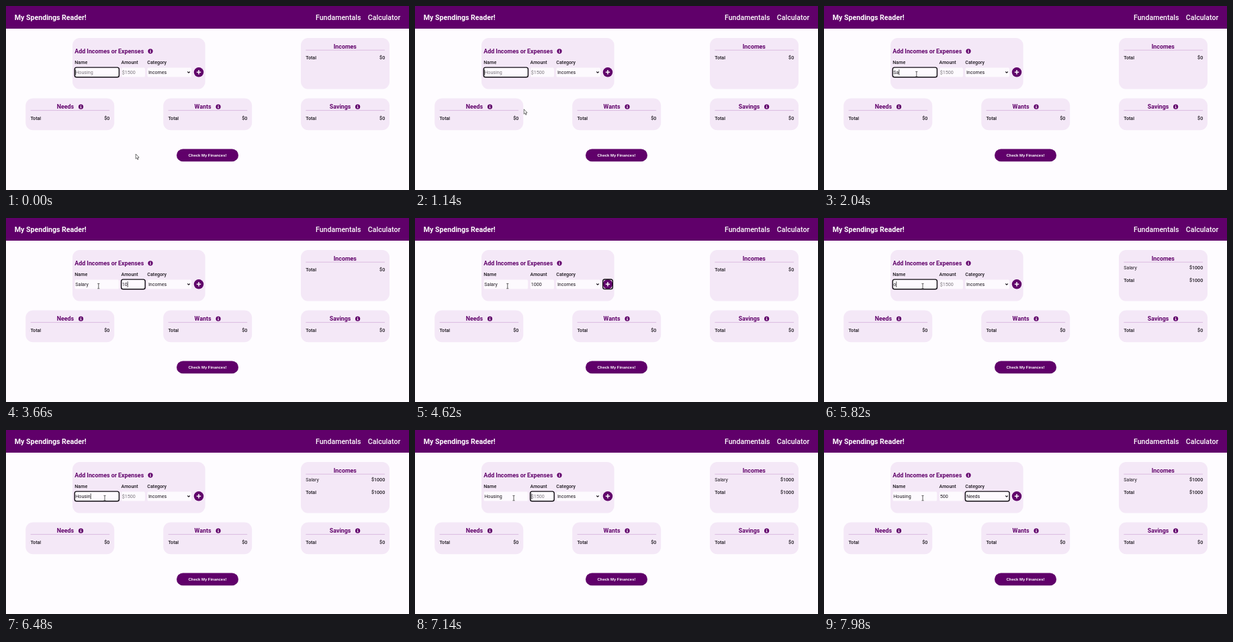
These frames come from a looping animation (600x276 px, 8000 ms). An HTML page with a canvas:

```html
<!DOCTYPE html>
<html lang="en">
<head>
<meta charset="utf-8">
<title>Budget form</title>
<style>
html, body { margin: 0; width: 100%; height: 100%; overflow: hidden; background: #fefcff; }
canvas { display: block; width: 600px; height: 276px; }
</style>
</head>
<body>
<canvas id="stage"></canvas>
<script>
const LOOP = 8000, BLINK = 300;
const PURPLE = '#60006a', CARD = '#f4e8f7', PAGE = '#fefcff', FIELD = '#fdfafe';
const INK = '#1c171e', GREY = '#7b767d', RULE = '#cfa9d6';
const BODY = 7.11, HEAD = 8.85;

const canvas = document.getElementById('stage');
const ctx = canvas.getContext('2d');
const dpr = window.devicePixelRatio || 1;
canvas.width = 600 * dpr;
canvas.height = 276 * dpr;
ctx.scale(dpr, dpr);

// Each entry lists only what it changes in the form.
const events = [
  [-60, { focus: 'name', name: '', amount: '', category: 'Incomes', saved: false }],
  [1800, { name: 'S' }],
  [2040, { name: 'Sa' }],
  [2160, { name: 'Sal' }],
  [2280, { name: 'Sala' }],
  [2370, { name: 'Salar' }],
  [2460, { name: 'Salary' }],
  [2580, { focus: 'amount' }],
  [2820, { amount: '1' }],
  [3000, { amount: '10' }],
  [3780, { amount: '100' }],
  [3900, { amount: '1000' }],
  [4200, { focus: 'category' }],
  [4500, { focus: 'add' }],
  [4800, { name: '', amount: '', saved: true }],
  [5400, { focus: 'name' }],
  [5820, { name: 'o' }],
  [6000, { name: '' }],
  [6120, { name: 'H' }],
  [6180, { name: 'Ho' }],
  [6240, { name: 'Hou' }],
  [6300, { name: 'Hous' }],
  [6420, { name: 'Housi' }],
  [6480, { name: 'Housin' }],
  [6540, { name: 'Housing' }],
  [6660, { focus: 'amount' }],
  [7140, { amount: '' }],
  [7200, { amount: '5' }],
  [7260, { amount: '50' }],
  [7320, { amount: '500' }],
  [7500, { focus: 'category' }],
  [7800, { category: 'Needs' }]
];

function formAt(t) {
  const form = {};
  for (const [at, change] of events) {
    if (at > t) break;
    Object.assign(form, change);
    form.caret = Math.floor((t - at) / BLINK) % 2 === 0;
  }
  return form;
}

function text(str, x, y, size = BODY, weight = 500, color = INK, align = 'left', family = 'Roboto') {
  ctx.font = `${weight} ${size}px ${family}, sans-serif`;
  ctx.fillStyle = color;
  ctx.textAlign = align;
  ctx.fillText(str, x, y);
}

function box(x, y, w, h, r, color) {
  ctx.beginPath();
  ctx.roundRect(x, y, w, h, r);
  ctx.fillStyle = color;
  ctx.fill();
}

function disc(x, y, r) {
  ctx.beginPath();
  ctx.arc(x, y, r, 0, Math.PI * 2);
  ctx.fillStyle = PURPLE;
  ctx.fill();
}

function line(points, color, width) {
  ctx.beginPath();
  points.forEach(([x, y], i) => i ? ctx.lineTo(x, y) : ctx.moveTo(x, y));
  ctx.strokeStyle = color;
  ctx.lineWidth = width;
  ctx.stroke();
}

function ring(x, y, w, h) {
  ctx.beginPath();
  ctx.roundRect(x, y, w, h, 2.8);
  ctx.strokeStyle = '#100c12';
  ctx.lineWidth = 1.4;
  ctx.stroke();
}

function info(x, y) {
  disc(x, y, 3.6);
  ctx.fillStyle = '#fff';
  ctx.fillRect(x - 0.5, y - 2.2, 1.1, 1.1);
  ctx.fillRect(x - 0.9, y - 0.5, 1.4, 0.7);
  ctx.fillRect(x - 0.4, y - 0.5, 0.9, 2.2);
  ctx.fillRect(x - 1.1, y + 1.3, 2.3, 0.7);
}

function row(label, value, x, y, weight = 500) {
  text(label, x + 7.3, y, BODY, weight);
  text(value, x + 125.2, y, BODY, 500, INK, 'right');
}

function card(title, x, titleX, iconX) {
  box(x, 138.6, 132, 47.6, 11, CARD);
  text(title, titleX, 154.2, HEAD, 700, PURPLE);
  info(iconX, 151.2);
  line([[x + 7.4, 156.6], [x + 125, 156.6]], RULE, 0.7);
  row('Total', '$0', x, 170.6);
}

function incomes(saved) {
  const x = 439;
  box(x, 48, 132, 76.6, 11, CARD);
  text('Incomes', 504.8, 63.8, HEAD, 700, PURPLE, 'center');
  line([[x + 7.4, 66.2], [x + 125, 66.2]], RULE, 0.7);
  if (saved) row('Salary', '$1000', x, 76.6, 400);
  row('Total', saved ? '$1000' : '$0', x, saved ? 95.6 : 80);
}

function input(x, w, value, hint, focused, caret) {
  box(x, 92.6, w, 14, 2.2, FIELD);
  if (focused) ring(x - 0.2, 92.1, w + 0.4, 14.6);
  text(value || hint, x + 0.9, 102.2, BODY, 400, value ? INK : GREY);
  if (focused && caret) {
    const end = x + 1 + (value ? ctx.measureText(value).width : 0);
    ctx.fillStyle = '#111';
    ctx.fillRect(end, 95.2, 0.7, 8.8);
  }
}

function entryForm(form) {
  box(99, 48, 197.6, 76.6, 11, CARD);
  text('Add Incomes or Expenses', 102.2, 71, HEAD, 700, PURPLE);
  info(215, 67.8);
  text('Name', 102.3, 86.7);
  text('Amount', 171.6, 86.7);
  text('Category', 210.3, 86.7);

  input(102.4, 65.8, form.name, 'Housing', form.focus === 'name', form.caret);
  input(171.8, 35.2, form.amount, '$1500', form.focus === 'amount', form.caret);

  box(210.4, 92.6, 65.6, 14, 2.2, FIELD);
  if (form.focus === 'category') ring(210.3, 92.1, 65.8, 14.6);
  text(form.category, 211.9, 102.2, BODY, 400);
  line([[270.3, 98.5], [272, 100.3], [273.7, 98.5]], INK, 1.1);

  disc(287, 99.3, 7.2);
  line([[283.8, 99.3], [290.2, 99.3]], '#fff', 1.5);
  line([[287, 96.1], [287, 102.5]], '#fff', 1.5);
  if (form.focus === 'add') ring(279.7, 92, 14.6, 14.6);
}

function slide(t, start, end) {
  const k = Math.min(1, Math.max(0, (t - start) / (end - start)));
  return k * k * (3 - 2 * k);
}

function pointer(t) {
  const k = slide(t, 720, 1500);
  const x = 193.2 - 55.4 * k + 9.2 * slide(t, 5100, 5400);
  const y = 222 - 120 * k;
  if (y < 107) {
    line([[x - 1.6, y - 3.6], [x + 1.6, y - 3.6]], '#333', 0.7);
    line([[x, y - 3.6], [x, y + 3.8]], '#333', 0.8);
    line([[x - 1.6, y + 3.8], [x + 1.6, y + 3.8]], '#333', 0.7);
    return;
  }
  ctx.beginPath();
  [[0, 0], [0, 7.2], [1.6, 5.8], [2.7, 8.4], [3.8, 7.9], [2.8, 5.4], [4.9, 5.2]]
    .forEach(([dx, dy]) => ctx.lineTo(x + dx, y + dy));
  ctx.closePath();
  ctx.fillStyle = '#fff';
  ctx.fill();
  ctx.strokeStyle = '#333';
  ctx.lineWidth = 0.7;
  ctx.stroke();
}

function draw(t) {
  const form = formAt(t);
  ctx.fillStyle = PAGE;
  ctx.fillRect(0, 0, 600, 276);
  ctx.fillStyle = PURPLE;
  ctx.fillRect(0, 0, 600, 34);
  text('My Spendings Reader!', 12.8, 20.9, 10.6, 700, '#fff');
  text('Fundamentals', 461, 20.8, 10.6, 500, '#fff');
  text('Calculator', 587.2, 20.8, 10.6, 500, '#fff', 'right');

  entryForm(form);
  incomes(form.saved);
  card('Needs', 29.2, 75.8, 111.5);
  card('Wants', 234.2, 280.6, 316);
  card('Savings', 439, 481.8, 523.6);

  box(254, 214.5, 92, 18.8, 9.4, PURPLE);
  text('Check My Finances!', 300, 226, 5.92, 700, '#fff', 'center', '"Liberation Sans"');
  pointer(t);
}

const start = performance.now();
function tick() {
  draw((performance.now() - start) % LOOP);
  requestAnimationFrame(tick);
}
tick();
</script>
</body>
</html>
```
